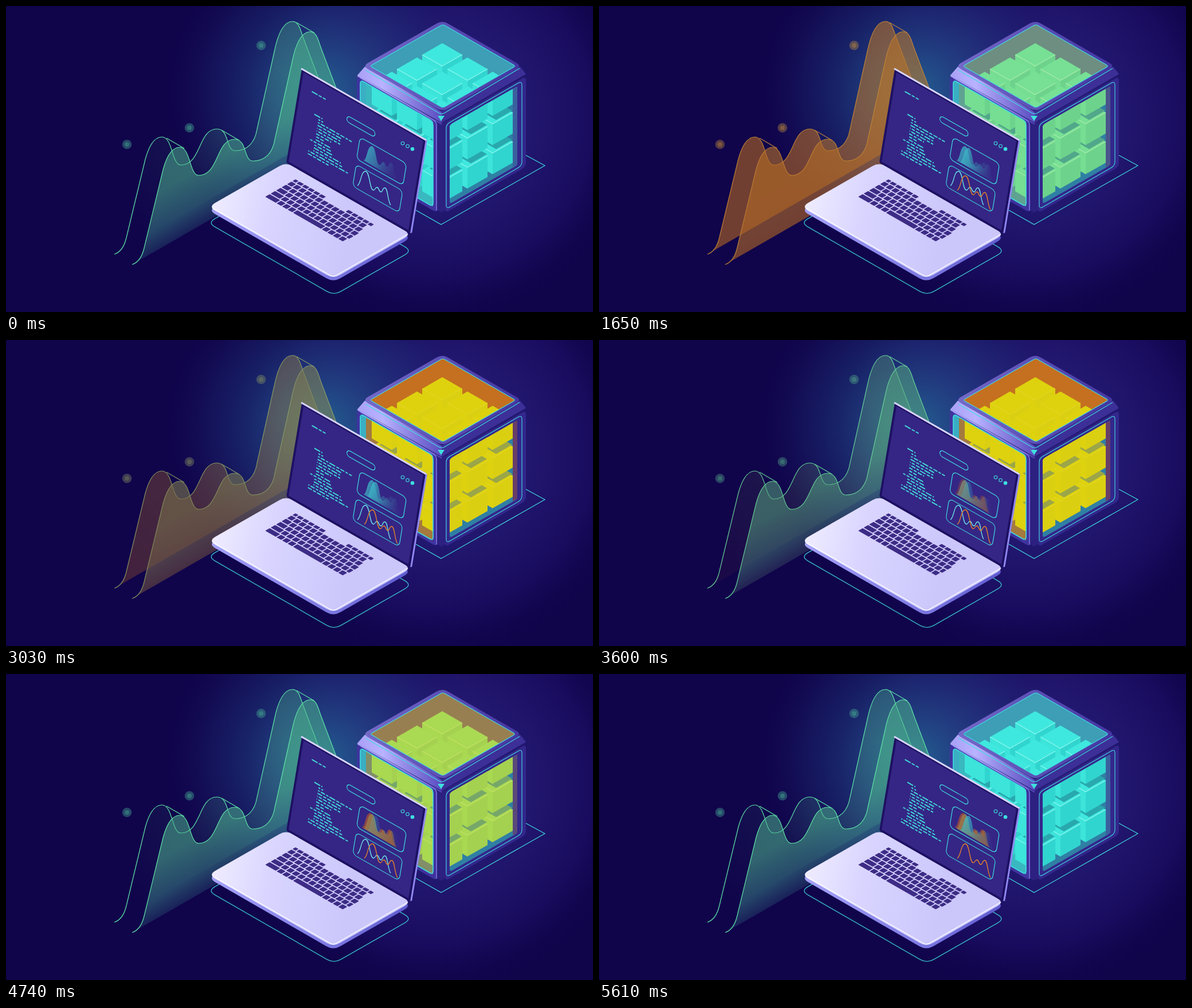
Recreate the animation shown at these times as an HTML page. Size 1024 by 535 pixels, loop 6330 ms.

```html
<!DOCTYPE html>
<html lang="en">
<head>
<meta charset="utf-8">
<title>Laptop, chart and cube</title>
<style>
html, body { margin: 0; height: 100%; overflow: hidden; background: #10044b; }
svg { display: block; width: 100vw; height: 100vh; }
.cyan { fill: none; stroke: #3fdde0; stroke-width: 1.1; }
.top { fill: var(--top); }
.shade { fill: var(--shade); }
.left { fill: var(--left); }
.right { fill: var(--right); }
.edge { fill: none; stroke: var(--edge); stroke-width: 1.2; }
</style>
</head>
<body>
<svg viewBox="0 0 1024 535" preserveAspectRatio="none">
  <defs>
    <radialGradient id="violet" gradientUnits="userSpaceOnUse" cx="745" cy="195" r="370">
      <stop offset="0" stop-color="#2c2080"/><stop offset=".45" stop-color="#22176f"/>
      <stop offset=".75" stop-color="#190c5f"/><stop offset="1" stop-color="#10044b" stop-opacity="0"/>
    </radialGradient>
    <radialGradient id="blue" gradientUnits="userSpaceOnUse" cx="550" cy="150" r="275">
      <stop offset="0" stop-color="#237a9c" stop-opacity=".75"/><stop offset=".35" stop-color="#22548c" stop-opacity=".55"/>
      <stop offset=".7" stop-color="#1c2a72" stop-opacity=".4"/><stop offset="1" stop-color="#14105a" stop-opacity="0"/>
    </radialGradient>
    <linearGradient id="greenBack" gradientUnits="userSpaceOnUse" x1="230" y1="400" x2="520" y2="160">
      <stop offset="0" stop-color="#4db58c" stop-opacity="0"/><stop offset=".4" stop-color="#4db58c" stop-opacity=".08"/>
      <stop offset="1" stop-color="#4db58c" stop-opacity=".34"/>
    </linearGradient>
    <linearGradient id="greenFront" gradientUnits="userSpaceOnUse" x1="300" y1="270" x2="358" y2="371">
      <stop offset="0" stop-color="#4cb38c" stop-opacity=".54"/><stop offset=".5" stop-color="#409a90" stop-opacity=".42"/>
      <stop offset="1" stop-color="#34808c" stop-opacity="0"/>
    </linearGradient>
    <linearGradient id="base" gradientUnits="userSpaceOnUse" x1="359" y1="350" x2="600" y2="400">
      <stop offset="0" stop-color="#efecff"/><stop offset=".4" stop-color="#d9d5ff"/><stop offset="1" stop-color="#cbc7fb"/>
    </linearGradient>
    <linearGradient id="side"><stop offset="0" stop-color="#a5a2fa"/><stop offset="1" stop-color="#5f5cd0"/></linearGradient>
    <linearGradient id="beam"><stop offset="0" stop-color="#a9a0f6"/><stop offset=".3" stop-color="#b9b2ff"/><stop offset="1" stop-color="#5a4cc0"/></linearGradient>
    <linearGradient id="rim"><stop offset="0" stop-color="#7469c8"/><stop offset="1" stop-color="#4336a2"/></linearGradient>
    <linearGradient id="miniTeal" x2="1" y2=".6">
      <stop offset="0" stop-color="#3fc6cf" stop-opacity=".8"/><stop offset=".5" stop-color="#3aa5bb" stop-opacity=".55"/>
      <stop offset="1" stop-color="#3a5a9a" stop-opacity=".15"/>
    </linearGradient>
    <clipPath id="windows"></clipPath>
  </defs>
  <rect width="1024" height="535" fill="#10044b"/>
  <rect width="1024" height="535" fill="url(#violet)"/>
  <rect width="1024" height="535" fill="url(#blue)"/>
  <g id="cube"></g>
  <g id="green"></g>
  <g id="orange"></g>
  <g id="laptop"></g>
</svg>
<script>
const $ = id => document.getElementById(id);
const path = (d, attrs) => `<path d="${d}" ${attrs}/>`;
const rect = (x, y, w, h, r) => `<rect x="${x}" y="${y}" width="${w}" height="${h}" rx="${r}"/>`;
const circle = (x, y, r, attrs) => `<circle cx="${x}" cy="${y}" r="${r}" ${attrs}/>`;

// Parallelogram from a corner and two sides, with corners rounded by r
function para(x, y, ax, ay, bx, by, r = 0) {
  const p = [[x, y], [x + ax, y + ay], [x + ax + bx, y + ay + by], [x + bx, y + by]];
  const toward = ([x, y], [u, v]) => {
    const k = r / Math.hypot(u - x, v - y);
    return [x + (u - x) * k, y + (v - y) * k];
  };
  return p.map((c, i) => `${i ? 'L' : 'M'}${toward(c, p[(i + 3) % 4])}Q${c} ${toward(c, p[(i + 1) % 4])}`).join('') + 'Z';
}
// Isometric faces
const slope = .575;
const lid = (x, y, w, r) => para(x, y, w, w * slope, -w, w * slope, r);
const leftFace = (x, y, w, h, r) => para(x, y, w, w * slope, 0, h, r);
const rightFace = (x, y, w, h, r) => para(x, y, w, -w * slope, 0, h, r);

// Big chart: one wave drawn twice, the front copy shifted along the depth axis
const wave = 'M189,434C201,430 207,418 210,405L243,268C249,246 258,229 272,229C291,229 289,278 305,278' +
  'C341,278 335,215 368,215C390,215 383,253 400,253C420,253 434,240 438,215L468,80C474,50 484,27 500,27' +
  'C511,27 514,43 518,54L560,166';
const ribs = 'M280,231l31,18M376,217l31,18M507,29l31,18';
const dots = [[445, 69], [320, 213], [211, 242]];

function chart(back, front, line, dot) {
  const stroke = `fill="none" stroke="${line}" stroke-width="1.2"`;
  const layer = fill => path(wave + 'V220Z', `fill="${fill}"`) + path(wave, stroke);
  return layer(back) + `<g transform="translate(31 18)">${layer(front)}</g>` + path(ribs, stroke) +
    dots.map(([x, y]) => [8.3, 4].map(r => circle(x, y, r, `fill="${dot}" fill-opacity=".4"`)).join('')).join('');
}
const amber = 'rgba(210,120,28,.6)';
$('green').innerHTML = chart('url(#greenBack)', 'url(#greenFront)', '#5fe3a8', '#45ad94');
$('orange').innerHTML = chart(amber, amber, '#d98a2b', '#d9902f');

// Glass cube holding 3 x 3 x 3 blocks
function block(i, j, k) {
  const x = 761 + 44 * (i - j), y = 85 + 25 * (i + j) + 51 * k;
  return path(lid(x, y - 20, 35), 'class="top"') +
    (k ? path(lid(x + 6, y - 19, 28), 'class="shade"') : '') +
    path(leftFace(x - 35, y, 35, 37), 'class="left"') +
    path(rightFace(x, y + 20, 35, 37), 'class="right"') +
    path(`M${x - 35},${y}l35,20l35,-20`, 'class="edge"');
}
let blocks = '';
for (let k = 2; k >= 0; k--)
  for (let i = 0; i < 3; i++)
    for (let j = 0; j < 3; j++) blocks += block(i, j, k);

const topPane = lid(762, 32, 127, 4);
const leftPane = leftFace(618, 129, 127, 149, 7);
const rightPane = rightFace(774, 208, 118, 138, 5);
$('windows').innerHTML = [topPane, leftPane, rightPane].map(d => path(d, '')).join('');

$('cube').innerHTML =
  path('M907,261L940,279L759,382L715,357', 'class="cyan"') +
  // frames and glass
  path(leftFace(612, 121, 140, 160, 8), 'fill="#3f339f"') +
  path(rightFace(766, 204, 141, 158, 8), 'fill="#33278c"') +
  path('M752,203H766V357L759,361L752,357Z', 'fill="#2c2080"') +
  path(leftPane, 'fill="#3aaec2"') +
  path(leftFace(628, 135, 117, 148), 'fill="var(--pane)"') +
  path(rightPane, 'fill="#2f7fa4"') +
  path(rightFace(884, 145, 8, 137), 'fill="var(--strip)"') +
  // lid
  path(leftFace(613, 121, 147, 2, 0) + 'M613,121L626,106L760,185V204Z', 'fill="url(#beam)"') +
  path('M760,185L897,106L907,119L760,204Z', 'fill="#3d2f98"') +
  path(lid(761, 25, 139, 11), 'fill="url(#rim)"') +
  path(topPane, 'fill="var(--glass)"') +
  `<g clip-path="url(#windows)">${blocks}</g>` +
  path(topPane, 'class="cyan"') +
  path('M627,112L755,187Q760,190 765,187L896,109', 'class="cyan"') +
  path(leftPane, 'class="cyan" style="stroke-width:1.6"') +
  path(rightFace(768, 207, 132, 148, 7), 'class="cyan"') +
  path('M751,358V208Q751,203 746,200L618,126', 'fill="none" stroke="#8f86f0" stroke-width="1.2"') +
  path('M753,192h12l-6,9Z', 'fill="#3fe0dc"');

// Keyboard: five rows under a split row of function keys
let keys = '';
for (let row = 0; row < 6; row++) {
  const y = row ? 11 * row - 3 : 0, space = row == 5;
  for (let x = 0, w; x < 154; x += w) {
    w = x ? 11 : 8 + 3 * row;
    if (space && x > 45 && x < 60) w = 58;
    if (row || x < 55 || x > 105) keys += rect(x, y, Math.min(w - 1.8, 158 - x), row ? 9 : 6, 1);
  }
}

// Screen content, in the skewed axes of the display
const lengths = [14, 8, 59, 41, 40, 41, 26, 14, 26, 36, 31, 47, 50, 69, 36];
const codeLine = (x, y, w, n) => path(`M${x},${y}h${w}`,
  `stroke="#42dfdb" stroke-width="1.9" stroke-dasharray="10 2 5 2 7 2 4 2" stroke-dashoffset="${n * 7 % 19}"`);
const code = codeLine(22, 27, 24, 0) + lengths.map((w, n) =>
  codeLine(n % 9 && n < 13 ? 40 : 32, 61 + n * 4.9, w, n)).join('');

const mini = 'M0,0C6,-2 6,-25 14,-25C22,-25 21,8 28,8C31,8 31,3 34,3C38,3 37,11 41,11C45,11 43,4 48,4C53,4 53,28 58,34';
const hill = (id, x, y, fill) => path(mini + 'L0,0Z', `id="${id}" transform="translate(${x} ${y})" fill="${fill}"`);
const curve = (id, x, y, color) =>
  path(mini, `id="${id}" transform="translate(${x} ${y})" fill="none" stroke="${color}" stroke-width="1.3"`);

$('laptop').innerHTML =
  path(para(488, 301, 220, 127, -136, 78, 14), 'class="cyan"') +
  path(para(489, 279, 218, 126, -136, 78, 14), 'fill="url(#side)"') +
  path(para(489, 273, 218, 126, -136, 78, 14), 'fill="url(#base)"') +
  path('M360,353L566,471Q571,474 576,471L701,399', 'fill="none" stroke="#fff" stroke-width="1.3"') +
  `<g transform="matrix(.866 .5 -.866 .5 505 303)" fill="#3d2c85">${keys}</g>` +
  path(para(518, 110, 217, 124, -27, 164, 3), 'fill="#8f88f0"') +
  path(para(516, 110, 216, 124, -27, 164, 3), 'fill="#1d1062"') +
  path('M516,110L732,234', 'stroke="#d9d5ff" stroke-width="3" stroke-linecap="round"') +
  path(para(519, 116, 209, 120, -26, 156), 'fill="#352685"') +
  `<g transform="matrix(1 .571 -.165 1 516 110)">${code}<g class="cyan">` +
  rect(85, 33, 49, 10, 5) + rect(111, 56, 81, 38, 7) + rect(112, 103, 81, 38, 7) + '</g></g>' +
  [0, 1, 2].map(n => circle(692 + 8.5 * n, 240 + 5 * n, 2.8, `class="cyan" ${n > 1 ? 'style="fill:#3fe0dc"' : ''}`)).join('') +
  hill('tealHill', 624, 270, 'url(#miniTeal)') +
  hill('amberBack', 621, 268, 'rgba(190,88,40,.62)') +
  hill('amberFront', 624, 270, 'rgba(165,122,55,.5)') +
  hill('secondHill', 630, 273, 'url(#miniTeal)') +
  curve('tealCurve', 613, 314, '#6fe6ea') +
  curve('amberCurve', 625, 322, '#e8822a');

// Block and glass colours, cool and warm
const tints = {
  top: [[63, 232, 222], [222, 210, 15]],
  shade: [[41, 168, 174], [155, 166, 72]],
  left: [[60, 228, 218], [222, 210, 15]],
  right: [[49, 213, 207], [219, 207, 18]],
  edge: [[140, 248, 240], [226, 215, 35]],
  glass: [[61, 158, 182], [196, 112, 32]],
  pane: [[57, 184, 192], [164, 122, 62]],
  strip: [[58, 96, 158], [104, 62, 104]]
};

function frame(now) {
  const t = now % 6330;
  const ramp = (from, to) => Math.min(1, Math.max(0, (t - from) / (to - from)));
  const ease = (from, to) => Math.sin(ramp(from, to) * Math.PI / 2);
  const warm = ease(420, 2370) - ease(2400, 4050);
  const cube = ramp(1080, 2700) - ramp(4320, 5610);
  const amberHill = ramp(3060, 4050), amberCurve = ramp(1080, 1650);
  const fades = {
    green: 1 - warm,
    orange: warm,
    amberBack: amberHill,
    amberFront: amberHill,
    secondHill: amberCurve - amberHill + ramp(4320, 5610),
    amberCurve,
    tealCurve: 1 - ramp(4980, 5610)
  };
  for (const id in fades) $(id).style.opacity = fades[id];
  for (const name in tints) {
    const [a, b] = tints[name];
    $('cube').style.setProperty('--' + name, `rgb(${a.map((v, n) => v + (b[n] - v) * cube)})`);
  }
  requestAnimationFrame(frame);
}
frame(performance.now());
</script>
</body>
</html>
```
